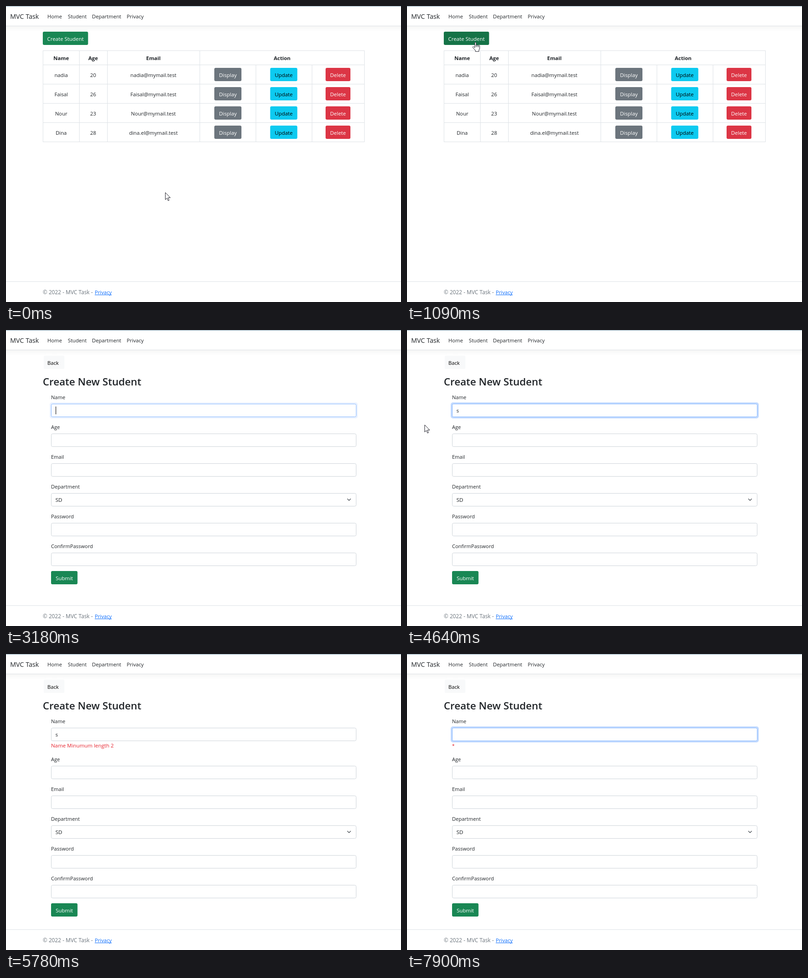
An HTML page with a canvas that plays this animation: 859 px wide and 646 px high, repeating every 8 s.

```html
<!DOCTYPE html>
<html lang="en">
<head>
<meta charset="utf-8">
<title>MVC Task</title>
<style>
html, body { margin: 0; width: 100%; height: 100%; overflow: hidden; background: #fff; }
canvas { display: block; }
</style>
</head>
<body>
<canvas id="stage" width="859" height="646"></canvas>
<script>
const ctx = document.getElementById('stage').getContext('2d');
const LOOP = 8000;
const INK = '#212529', LINE = '#dee2e6', GREEN = '#198754', RED = '#dc3545', MUTED = '#6c757d';

// Pointer poses: time, x, y, shape. Each holds until the next one.
const POINTER = [
  [0, 346.5, 407, 'arrow'], [60, 301, 341, 'arrow'], [140, 256, 275, 'arrow'],
  [400, 218.5, 213, 'arrow'], [470, 205, 185, 'arrow'], [550, 189, 150, 'arrow'],
  [620, 174, 123, 'arrow'], [870, 168, 110, 'arrow'], [950, 160, 96, 'arrow'],
  [1030, 146, 82, 'hand'], [1090, 142, 78, 'hand'], [1180, 139, 74, 'hand'],
  [1270, 136.5, 71, 'hand'], [2410, 143, 84, 'arrow'], [2480, 149, 106, 'arrow'],
  [2550, 154, 132, 'arrow'], [2630, 162, 166, 'beam'], [2700, 166, 170, 'beam'],
  [3130, 0, 0, ''], [4490, 84, 189, 'arrow'], [4570, 56, 200, 'arrow'],
  [4640, 38.5, 207, 'arrow'], [5530, 52, 203, 'arrow'], [5610, 69, 197, 'arrow'],
  [5690, 84, 191, 'arrow'], [5780, 0, 0, '']
];

// Strength of the focus ring round the name field: time, value.
const FOCUS = [
  [0, 0], [3130, .35], [3200, .7], [3260, 1], [4890, .65], [4970, .3],
  [5050, 0], [6340, .35], [6410, .7], [6490, 1]
];

// Caret position, 0 when hidden: time, x.
const CARET = [[0, 0], [3130, 108], [3610, 0], [4010, 113], [4490, 0],
  [6340, 113], [6830, 0], [7330, 108], [7900, 0]];

const ROWS = [
  ['nadia', '20', 'nadia@mymail.test'],
  ['Faisal', '26', 'Faisal@mymail.test'],
  ['Nour', '23', 'Nour@mymail.test'],
  ['Dina', '28', 'dina.el@mymail.test']
];
const FIELDS = ['Name', 'Age', 'Email', 'Department', 'Password', 'ConfirmPassword'];

const SHAPES = {
  arrow: new Path2D('M0 0V15.6L3.6 12.3 6.1 18 8.3 17 5.9 11.4H10.8Z'),
  hand: new Path2D('M5.5 13V2.5a1.4 1.4 0 0 1 2.8 0V8a1.3 1.3 0 0 1 2.6.4' +
    'a1.3 1.3 0 0 1 2.6.6a1.2 1.2 0 0 1 2.5.8V15L14.3 18.5V21.3H6.7V18.8' +
    'L1.2 12.6a1.4 1.4 0 0 1 2.2-1.7Z'),
  knuckles: new Path2D('M8.3 8V11.5M10.9 8.6V11.5M13.5 9.3V11.8'),
  beam: new Path2D('M-3 -7.5H-1L0 -6.5 1 -7.5H3M0 -6.5V6.5M-3 7.5H-1L0 6.5 1 7.5H3')
};

const at = (keys, t) => keys.filter(k => k[0] <= t).pop();

function rect(x, y, w, h, color) {
  ctx.fillStyle = color;
  ctx.fillRect(x, y, w, h);
}

function box(x, y, w, h, r, fill, stroke) {
  ctx.beginPath();
  ctx.roundRect(x, y, w, h, r);
  if (fill) { ctx.fillStyle = fill; ctx.fill(); }
  if (stroke) { ctx.strokeStyle = stroke; ctx.lineWidth = 1; ctx.stroke(); }
}

function text(str, x, y, { size = 11.2, color = INK, weight = 400, align = 'left' } = {}) {
  ctx.font = `${weight} ${size}px "Open Sans", "Noto Sans", sans-serif`;
  ctx.textAlign = align;
  ctx.fillStyle = color;
  ctx.fillText(str, x, y);
}

function button(label, x, y, w, fill, color = '#fff') {
  box(x, y, w, 29, 3, fill);
  text(label, x + w / 2, y + 19.5, { size: 11.4, color, align: 'center' });
}

function drawFrame() {
  rect(0, 0, 859, 646, '#fff');
  const shade = ctx.createLinearGradient(0, 44, 0, 56);
  shade.addColorStop(0, 'rgba(0,0,0,.035)');
  shade.addColorStop(1, 'rgba(0,0,0,0)');
  rect(0, 44, 859, 12, shade);
  rect(0, 0, 859, 1, '#7d9fb2');
  rect(0, 43, 859, 1, LINE);
  text('MVC Task', 9, 28, { size: 14.2 });
  text('Home', 90, 27);
  text('Student', 134.5, 27);
  text('Department', 187, 27);
  text('Privacy', 262.5, 27);

  rect(0, 601, 859, 1, LINE);
  text('© 2022 - MVC Task -', 80, 629, { size: 11.8, color: MUTED });
  text('Privacy', 193, 629, { color: '#0d6efd' });
  rect(193, 630, 37, 1, '#0d6efd');
}

function drawList(t, [, px, py, shape]) {
  const press = Math.min(1, Math.max(0, (t - 1490) / 240));
  if (press) {
    ctx.globalAlpha = press * .5;
    box(76.5, 53, 105.5, 35, 6, '#3c996e');
    ctx.globalAlpha = 1;
  }
  button('Create Student', 80, 56, 98.5, press ? '#146c43' : shape === 'hand' ? '#157347' : GREEN);

  const hover = shape === 'arrow' && py >= 128 && py < 296 ? Math.floor((py - 128) / 42) : -1;
  if (hover >= 0) rect(80, 128 + 42 * hover, 700, 42, '#ececec');

  for (const y of [97, 128, 170, 212, 254, 296]) rect(80, y, 700, 1, LINE);
  for (const x of [80, 159, 220, 421, 779]) rect(x, 97, 1, 199, LINE);
  for (const x of [543, 665]) rect(x, 128, 1, 168, LINE);

  const centers = [120, 189.5, 320.5, 600.5];
  ['Name', 'Age', 'Email', 'Action'].forEach((s, i) =>
    text(s, centers[i], 118, { size: 11.4, weight: 700, align: 'center' }));
  ROWS.forEach((row, r) => {
    const y = 135 + 42 * r;
    row.forEach((s, i) => text(s, centers[i], y + 20, { align: 'center' }));
    button('Display', 453, y, 59, MUTED);
    button('Update', 574.5, y, 59, '#0dcaf0', '#000');
    button('Delete', 695, y, 54, RED);
  });
}

function drawForm(t) {
  const shift = t >= 4890 ? 18 : 0;
  const focus = at(FOCUS, t)[1];
  const caret = at(CARET, t)[1];

  box(82, 56, 45, 29, 3, '#f8f9fa');
  text('Back', 90, 76, { color: '#000' });
  text('Create New Student', 80, 120.5, { size: 22.2, weight: 600 });

  FIELDS.forEach((label, i) => {
    const y = Math.round(161 + 64.9 * i) + (i ? shift : 0);
    const active = !i && focus;
    text(label, 98, y - 10, { size: 11 });
    if (active) box(95, y - 3, 670, 35, 5, `rgba(13,110,253,${.25 * focus})`);
    box(98.5, y + .5, 663, 28, 3, '#fff', active ? '#86b7fe' : '#ced4da');
    if (label === 'Department') {
      text('SD', 107.5, y + 19, { size: 11.6 });
      ctx.beginPath();
      ctx.moveTo(742.3, y + 12.3);
      ctx.lineTo(746, y + 16);
      ctx.lineTo(749.7, y + 12.3);
      ctx.strokeStyle = '#4a5056';
      ctx.lineWidth = 1.3;
      ctx.stroke();
    }
  });

  if (t >= 4010 && t < 7330) text('s', 107.5, 180, { size: 11.4 });
  if (caret) rect(caret, 167, 1, 17, '#000');
  if (shift) {
    const long = t < 7480;
    text(long ? 'Name Minumum length 2' : '*', 98, 204, { size: long ? 11.4 : 10, color: '#e6252f' });
  }
  button('Submit', 98, 526 + shift, 57.5, GREEN);
}

function drawPointer([, x, y, shape]) {
  if (!shape) return;
  ctx.save();
  ctx.translate(x, y);
  ctx.lineWidth = 1;
  ctx.lineJoin = 'round';
  ctx.fillStyle = '#fff';
  ctx.strokeStyle = '#23232d';
  if (shape !== 'beam') ctx.fill(SHAPES[shape]);
  ctx.stroke(SHAPES[shape]);
  if (shape === 'hand') ctx.stroke(SHAPES.knuckles);
  ctx.restore();
}

function render(t) {
  const pointer = at(POINTER, t);
  drawFrame();
  if (t < 1810) drawList(t, pointer);
  else drawForm(t);
  drawPointer(pointer);
}

const start = performance.now();
function tick() {
  render((performance.now() - start) % LOOP);
  requestAnimationFrame(tick);
}
tick();
</script>
</body>
</html>
```
